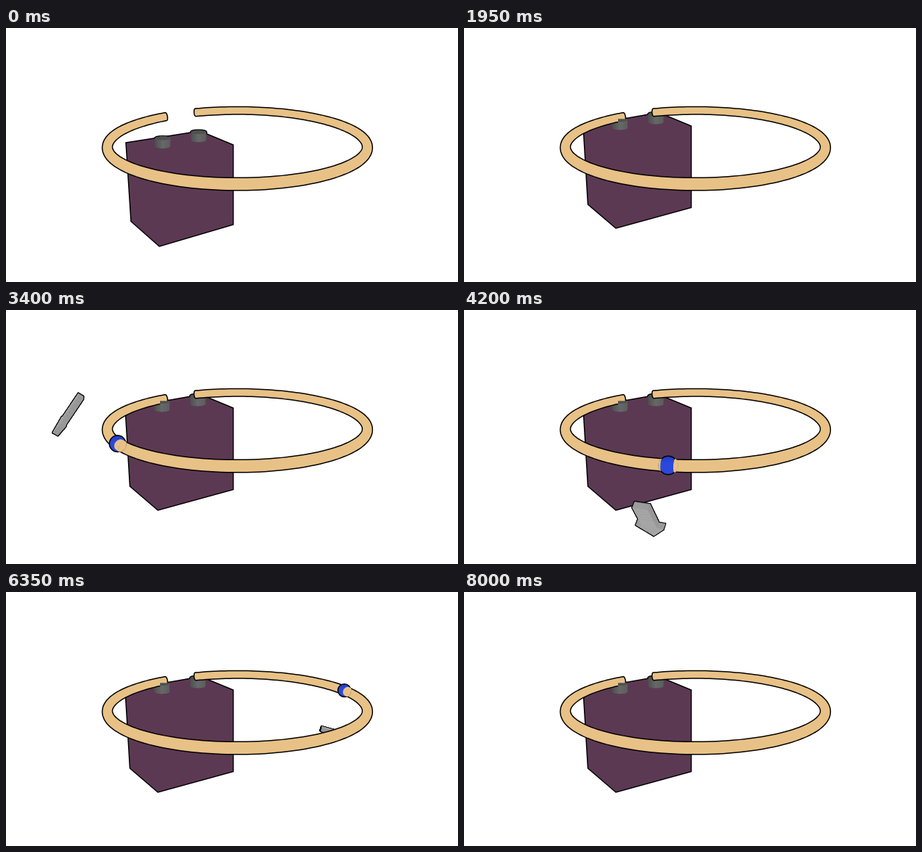
Recreate the animation shown at these times as an HTML page with a canvas. Size 622 by 350 pixels, loop 8.05 s.

```html
<!DOCTYPE html>
<html lang="en">
<head>
<meta charset="utf-8">
<title>Field around a current loop</title>
<style>
html, body { margin: 0; width: 100%; height: 100%; overflow: hidden; background: #fff; }
canvas { display: block; }
</style>
</head>
<body>
<canvas id="stage" width="622" height="350"></canvas>
<script>
const ctx = document.getElementById('stage').getContext('2d');
const RAD = Math.PI / 180;
const LOOP = 8050, STEP = 50, RISE = 2000, FLOW_END = 8000;
const TAN = '#e8c186', PURPLE = '#5c3953', BLUE = '#2a49dc';

// Camera: looks at the ring centre from above
const FOCAL = 680, DIST = 3.92, PITCH_SIN = 0.2746, PITCH_COS = 0.9615;
const EYE = [0, DIST * PITCH_SIN, DIST * PITCH_COS];
const CX = 318.4, CY = 152;

// Wire, carrier and arrow sizes in ring radii
const TUBE = 0.038, BEAD = 0.056, CUT = Math.sqrt(BEAD ** 2 - TUBE ** 2);
const ORBIT = 0.375, ARROW = 0.3, NECK = 0.05, THICK = 0.036;
const WIRE_START = -138 * RAD, WIRE_END = 204 * RAD;

const dot = (a, b) => a[0] * b[0] + a[1] * b[1] + a[2] * b[2];
const sub = (a, b) => a.map((v, i) => v - b[i]);
// add(p, k1, v1, k2, v2, ...) = p + k1 v1 + k2 v2 + ...
function add(p, ...terms) {
  const out = [...p];
  for (let i = 0; i < terms.length; i += 2)
    for (let j = 0; j < 3; j++) out[j] += terms[i] * terms[i + 1][j];
  return out;
}
const scaleAt = p => FOCAL / (DIST - p[1] * PITCH_SIN - p[2] * PITCH_COS);
function project(p) {
  const k = scaleAt(p);
  return [CX + k * p[0], CY - k * (p[1] * PITCH_COS - p[2] * PITCH_SIN)];
}
const UP = [0, 1, 0], ZERO = [0, 0, 0];
const outward = a => [Math.sin(a), 0, Math.cos(a)];
const along = a => [Math.cos(a), 0, -Math.sin(a)];

function trace(points) {
  ctx.beginPath();
  points.forEach(p => ctx.lineTo(...p));
  ctx.closePath();
}
function paint(fill, line, width = 1.5) {
  ctx.lineWidth = width;
  if (fill) { ctx.fillStyle = fill; ctx.fill(); }
  if (line) { ctx.strokeStyle = line; ctx.stroke(); }
}

// Outline of the wire between two angles, with rounded ends
function ribbon(from, to, cap) {
  const n = 160, left = [], right = [], ends = [];
  for (let i = 0; i <= n; i++) {
    const a = from + (to - from) * i / n;
    const [x, y] = project(outward(a));
    const [x2, y2] = project(outward(a + 0.001 * Math.sign(to - from)));
    const len = Math.hypot(x2 - x, y2 - y), tx = (x2 - x) / len, ty = (y2 - y) / len;
    const w = TUBE * scaleAt(outward(a));
    left.push([x - ty * w, y + tx * w]);
    right.unshift([x + ty * w, y - tx * w]);
    if (i === 0 || i === n) {
      const dir = i ? 1 : -1, arc = [];
      for (let k = 1; k < 8; k++) {
        const c = Math.cos(k * Math.PI / 8) * w * dir, s = Math.sin(k * Math.PI / 8) * cap * dir;
        arc.push([x - ty * c + tx * s, y + tx * c + ty * s]);
      }
      ends.push(arc);
    }
  }
  return [...left, ...ends[1], ...right, ...ends[0]];
}
const wire = ribbon(WIRE_START, WIRE_END, 2);

function terminalPath(x, y) {
  ctx.beginPath();
  ctx.ellipse(x, y + 3, 10.7, 2.8, 0, Math.PI, 2 * Math.PI);
  ctx.ellipse(x, y + 14, 10.5, 2.8, 0, 0, Math.PI);
  ctx.closePath();
}
function fillTerminal(x, y) {
  const g = ctx.createLinearGradient(x - 11, 0, x + 11, 0);
  g.addColorStop(0, '#4c4e4d');
  g.addColorStop(0.5, '#666967');
  g.addColorStop(1, '#5a5d5b');
  terminalPath(x, y);
  paint(g);
  ctx.beginPath();
  ctx.ellipse(x, y + 3, 10.4, 2.6, 0, 0, 2 * Math.PI);
  paint('#4d504e');
}

const LOW = [[165, 158], [267, 142], [312.7, 161], [312.7, 271], [211, 301], [172, 266.5]];
const HIGH = [[164, 135], [268, 116.5], [312.7, 135], [312.7, 247.5], [209, 276], [170.5, 243]];

function terminals(e) {
  return [[215.6 - 1.2 * e, 149 - 25.5 * e], [265 - e, 140.5 - 24.8 * e]];
}
function drawBattery(e) {
  const posts = terminals(e);
  for (const p of posts) {
    terminalPath(...p);
    paint(null, '#000', 2.6);
  }
  trace(LOW.map((p, i) => p.map((v, j) => v + (HIGH[i][j] - v) * e)));
  paint(PURPLE, '#000');
  for (const p of posts) fillTerminal(...p);
}
// The first terminal pokes out in front of the wire's end
function drawContact(e) {
  ctx.save();
  ctx.beginPath();
  ctx.rect(212, 125.5, 14, 50);
  ctx.clip();
  fillTerminal(...terminals(e)[0]);
  ctx.restore();
}

function drawBead(a) {
  const centre = outward(a), axis = along(a), view = sub(EYE, centre);
  const [x, y] = project(centre), radius = BEAD * scaleAt(centre);
  const disc = r => { ctx.beginPath(); ctx.arc(x, y, r, 0, 2 * Math.PI); };
  const shade = ctx.createLinearGradient(0, y - radius, 0, y + radius);
  shade.addColorStop(0, '#213bc4');
  shade.addColorStop(0.4, BLUE);
  shade.addColorStop(1, BLUE);
  disc(radius);
  paint(shade, '#000');
  ctx.save();
  disc(radius + 0.8);
  ctx.clip();
  // The wire leaves the bead through a round rim on either side
  const facing = Math.atan2(dot(view, UP), dot(view, centre));
  for (const side of [-1, 1]) {
    const rim = [], far = [];
    for (let k = -90; k <= 90; k += 6) {
      const f = facing + k * RAD;
      const off = add(ZERO, side * CUT, axis, TUBE * Math.cos(f), centre, TUBE * Math.sin(f), UP);
      if (dot(off, view) < 0) continue;
      const q = add(centre, 1, off);
      rim.push(project(q));
      far.unshift(project(add(q, side * 0.05, axis)));
    }
    const parts = [[...rim, ...far]];
    if (side * dot(axis, view) > 0) parts.push(rim, ribbon(a + side * CUT, a + side * 0.4, 0));
    for (const part of parts) {
      trace(part);
      paint(TAN, TAN, 0.6);
    }
  }
  ctx.restore();
}

// The arrow is cut into slices so each can be sorted against wire and battery
function arrowSlices(a, yaw, turn) {
  const out = outward(yaw), axis = along(yaw), c = Math.cos(turn), s = Math.sin(turn);
  const thick = add(ZERO, c, out, s, UP);
  const dir = add(ZERO, s, out, -c, UP);
  const centre = add(outward(a), ORBIT, thick);
  const half = ARROW / 2, slices = [];
  const cut = (from, to, n, width) => {
    for (let i = 0; i < n; i++) {
      const ends = [i, i + 1].map(k => from + (to - from) * k / n);
      const corners = [];
      for (const at of ends)
        for (const w of [-1, 1])
          for (const t of [-1, 1])
            corners.push(add(centre, at, dir, w * width(at), axis, t * THICK / 2, thick));
      const mid = add(centre, (ends[0] + ends[1]) / 2, dir);
      slices.push({ corners, mid, open: i === 0 });
    }
  };
  cut(-half, NECK, 7, () => 0.045);
  cut(NECK, half, 4, at => 0.083 * (half - at) / (half - NECK));
  return slices;
}
// Ends, sides, then the two broad faces
const FACES = [
  [[0, 1, 3, 2], '#9c9c9c'], [[0, 1, 5, 4], '#999'], [[2, 3, 7, 6], '#999'],
  [[0, 2, 6, 4], '#a4a4a4'], [[1, 3, 7, 5], '#a6a6a6']
];
function drawSlices(slices) {
  ctx.lineJoin = 'round';
  for (const { corners } of slices)
    for (const [ids] of FACES) {
      trace(ids.map(i => project(corners[i])));
      paint(null, '#000', 2.8);
    }
  FACES.forEach(([ids, color], n) => {
    for (const { corners, mid, open } of slices) {
      if (n === 0 && !open) continue;
      const face = ids.map(i => corners[i]);
      const heart = [0, 1, 2].map(j => face.reduce((sum, p) => sum + p[j], 0) / 4);
      if (dot(sub(heart, mid), sub(EYE, heart)) <= 0) continue;
      trace(face.map(project));
      paint(color, color, 0.7);
    }
  });
  ctx.lineJoin = 'miter';
}
function layerOf({ mid: [x, y, z] }) {
  if (y > 0) return 2;
  const hidden = y < -0.06 && z < -0.06 + (x + 0.69) * 1.62 && z < -0.06 - (x + 0.69) * 0.86;
  return hidden ? 0 : 1;
}

function draw(t) {
  const u = Math.min(t / RISE, 1), e = u * u * (3 - 2 * u);
  const flowing = t >= RISE && t < FLOW_END;
  const since = t - 3400;
  const angle = (-54.6 + 0.0565 * since) * RAD;
  const yaw = (-74 + 0.0693 * since) * RAD;
  const turn = (36.5 - 0.5385 * since) * RAD;
  const slices = flowing ? arrowSlices(angle, yaw, turn) : [];
  const layer = n => drawSlices(slices.filter(s => layerOf(s) === n));

  ctx.fillStyle = '#fff';
  ctx.fillRect(0, 0, 622, 350);
  layer(0);
  drawBattery(e);
  layer(1);
  trace(wire);
  paint(TAN, '#000');
  drawContact(e);
  if (flowing) drawBead(angle);
  layer(2);
}

const begin = performance.now();
function tick() {
  const t = (performance.now() - begin) % LOOP;
  draw(Math.floor(t / STEP) * STEP);
  requestAnimationFrame(tick);
}
tick();
</script>
</body>
</html>
```
